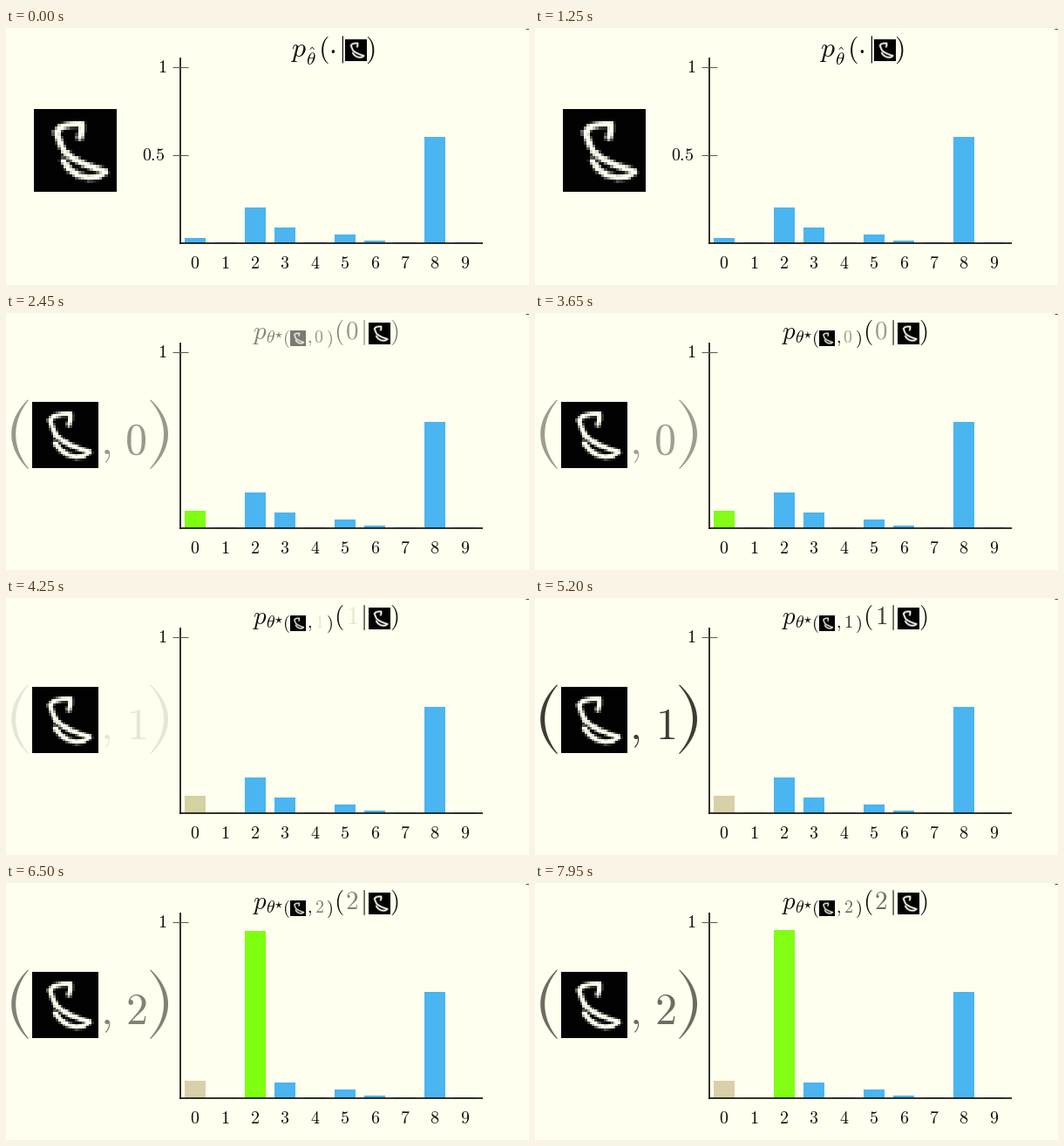
These frames come from a looping animation (600 by 295 pixels, 8000 ms). A matplotlib script:

```python
import numpy as np
import matplotlib.pyplot as plt
from matplotlib.animation import FuncAnimation
from matplotlib.colors import LinearSegmentedColormap
from matplotlib.patches import PathPatch, Rectangle
from matplotlib.path import Path

plt.rcParams["mathtext.fontset"] = "cm"

W, H, DPI = 600, 295, 100
LOOP, STEP = 8000, 50

PAPER = np.array([255, 255, 239]) / 255
INK = (0.07, 0.07, 0.05)
BLUE = np.array([74, 181, 240]) / 255
LIME = np.array([126, 255, 14]) / 255
TAN = np.array([215, 208, 168]) / 255

STARTS = [1525, 3425, 5550, 7775]   # ms at which each class is picked up
MOVE, FADE_OUT, FADE_IN, IN_DELAY = 1000, 450, 500, 670
LABEL_ALPHA = 0.82

BEFORE = [0.03, 0.006, 0.202, 0.09, 0.006, 0.048, 0.014, 0.004, 0.6, 0.006]
AFTER = [0.1, 0.004, 0.95]
BASE, UNIT = 247, 203


def smooth(t, start, length):
    """Sigmoid ease from 0 to 1."""
    u = np.clip((t - start) / length, 0, 1)
    sig = lambda x: 1 / (1 + np.exp(-x))
    low = sig(-5)
    return float(np.clip((sig(10 * (u - 0.5)) - low) / (1 - 2 * low), 0, 1))


def mix(a, b, u):
    return np.asarray(a) + (np.asarray(b) - np.asarray(a)) * u


fig = plt.figure(figsize=(W / DPI, H / DPI), dpi=DPI, facecolor=PAPER)
ax = fig.add_axes([0, 0, 1, 1])


def text(x, y, s, px, ha="center"):
    return ax.text(x, y, f"${s}$", fontsize=px * 72 / DPI, color=INK,
                   ha=ha, va="baseline", zorder=5)


def line(x0, y0, x1, y1, px, color=INK):
    return ax.plot([x0, x1], [y0, y1], color=color, lw=px * 72 / DPI,
                   solid_capstyle="butt", zorder=4)[0]


def big_paren(tip, belly):
    """Tall bracket drawn as a crescent between two curves."""
    side = 1 if belly > tip else -1
    outer = tip + (belly - tip) / 0.75
    inner = tip + (belly - side * 4 - tip) / 0.75
    top, bottom = 99.5, 179
    verts = [(tip, top), (outer, 124), (outer, 154), (tip, bottom),
             (tip + side * -1, bottom - 0.6), (inner - side, 154),
             (inner - side, 124), (tip - side, top + 0.6), (tip, top)]
    codes = [Path.MOVETO] + [Path.CURVE4] * 3 + [Path.LINETO]
    codes += [Path.CURVE4] * 3 + [Path.CLOSEPOLY]
    return ax.add_patch(PathPatch(Path(verts, codes), fc=INK, lw=0, zorder=5))


def handwritten(n=28):
    """Pen stroke rasterised on a small grid."""
    pen = np.array([(84, 126), (86, 118), (86, 110.5), (73, 111), (62, 114),
                    (57, 120), (61, 131), (66, 142), (75, 149), (88, 156),
                    (101, 161), (113, 165), (105, 171), (94, 172),
                    (82, 169), (72, 162), (65, 153)], float)
    pen = (pen - (31.5, 93.5)) / 94.5 * n
    gy, gx = np.mgrid[:n, :n] + 0.5
    grid = np.stack([gx, gy], -1)
    dist = np.full((n, n), 99.0)
    for a, b in zip(pen[:-1], pen[1:]):
        d = b - a
        u = np.clip(((grid - a) @ d) / (d @ d), 0, 1)
        dist = np.minimum(dist, np.hypot(*np.moveaxis(grid - a - u[..., None] * d, -1, 0)))
    return np.clip(1.55 - dist, 0, 1)


DIGIT = handwritten()
CMAP = LinearSegmentedColormap.from_list("pen", [(0.01, 0.01, 0.01), PAPER])


def picture(box, interpolation):
    art = ax.imshow(DIGIT, cmap=CMAP, vmin=0, vmax=1, aspect="auto",
                    interpolation=interpolation, zorder=3)
    place(art, box)
    return art


def place(art, box):
    x, y, size = box
    art.set_extent((x, x + size, y + size, y))


PHOTO = (31.5, 93.5, 94.5), (30, 102.3, 75.6)
THUMB = (389, 13.8, 24.4), (416, 11.3, 24.6)
photo = picture(PHOTO[0], "nearest")
thumb = picture(THUMB[0], "bilinear")
sub_thumb = picture((325.8, 20, 17.8), "bilinear")

# Chart
bars = []
for i, h in enumerate(BEFORE):
    x = 217 + 34.35 * i
    bars.append(ax.add_patch(Rectangle((x - 12.2, BASE), 24.4, -h * UNIT,
                                       fc=BLUE, lw=0, zorder=2)))
    text(x, 276.5, i, 20)
line(199.6, 34, 199.6, 247.8, 1.7)
line(198.8, 247, 547, 247, 1.7)
line(191, 44.5, 209, 44.5, 1, (0.35, 0.35, 0.32))
text(179, 51, 1, 20)
line(0, 294.5, W, 294.5, 1, (0.95, 0.94, 0.82))
line(596, 0.5, W, 0.5, 1, (0.3, 0.3, 0.25))

# Opening title and the half mark
opening = [
    line(191, 146, 209, 146, 1, (0.35, 0.35, 0.32)),
    text(169, 152.5, "0.5", 20),
    text(335.5, 33, "p", 32),
    text(349.5, 43, r"\hat{\theta}", 21),
    text(364, 33, "(", 32),
    text(374.5, 33, r"\cdot", 32),
    text(384.5, 33, "|", 32),
    text(417.5, 33, ")", 32),
]

# Title that stays after the first step
title = [
    text(292, 30, "p", 29),
    text(304, 34.5, r"\theta", 20),
    text(313, 28.5, r"{\star}", 14),
    text(321.5, 34.5, "(", 20),
    text(345, 34.5, ",", 20, "left"),
    text(370.5, 34.5, ")", 20),
    text(381.5, 30, "(", 29),
    text(409.5, 30, "|", 29),
    text(445.5, 30, ")", 29),
    sub_thumb,
]

# Candidate class, shown beside the picture and inside the title
digits = [text(149, 162, 0, 50), text(397, 30, 0, 29), text(359, 34.5, 0, 20)]
label = digits + [
    big_paren(25, 6.2),
    big_paren(166, 186),
    text(108.5, 162, ",", 50, "left"),
]

ax.set_xlim(0, W)
ax.set_ylim(H, 0)
ax.axis("off")


def fade(group, alpha):
    for art in group:
        art.set_alpha(alpha)
        art.set_visible(alpha > 0.004)


def update(frame):
    t = frame * STEP

    u = smooth(t, STARTS[0], MOVE)
    place(photo, mix(*PHOTO, u))
    place(thumb, mix(*THUMB, u))
    fade(opening, 1 - smooth(t, STARTS[0], FADE_OUT))
    fade(title, smooth(t, STARTS[0] + IN_DELAY, FADE_IN))

    alpha = 0
    for k, goal in enumerate(AFTER):
        begin, end = STARTS[k], STARTS[k + 1]
        u = smooth(t, begin, MOVE)
        bars[k].set_height(-UNIT * mix(BEFORE[k], goal, u))
        bars[k].set_facecolor(mix(mix(BLUE, LIME, u), TAN, smooth(t, end, MOVE)))
        if t >= begin + IN_DELAY:
            alpha = smooth(t, begin + IN_DELAY, FADE_IN) - smooth(t, end, FADE_OUT)
            for d in digits:
                d.set_text(f"${k}$")
    fade(label, LABEL_ALPHA * max(alpha, 0))
    return []


anim = FuncAnimation(fig, update, frames=LOOP // STEP, interval=STEP,
                     repeat=True, repeat_delay=0, blit=False)
plt.show()
```
